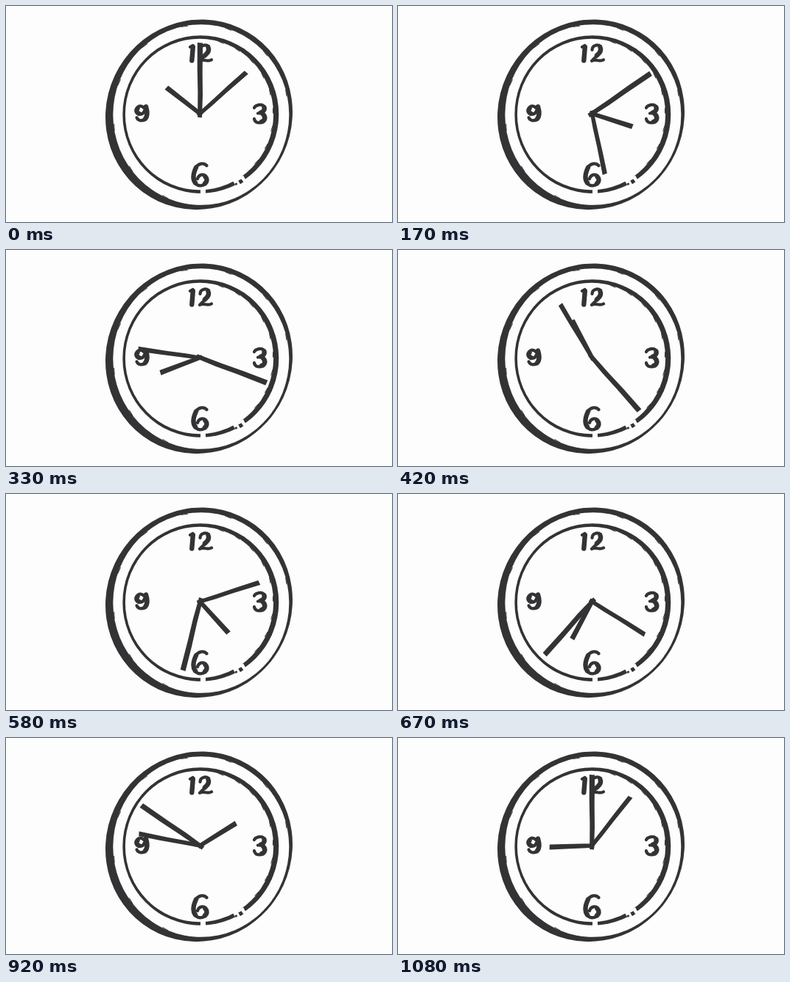
Animation, 524 px wide and 295 px high, one loop 1160 ms. Source, as an HTML page:

```html
<!DOCTYPE html>
<html lang="en">
<head>
<meta charset="utf-8">
<title>Clock</title>
<style>
  html, body { margin: 0; width: 100%; height: 100%; overflow: hidden; background: #fdfdfd; }
  svg { display: block; width: 100vw; height: 100vh; }
  .ink { fill: #333335; }
  .paper { fill: #fdfdfd; }
  .line { fill: none; stroke: #333335; stroke-linecap: round; stroke-linejoin: round; }
  .thin { stroke-width: 4.2; }
  .bold { stroke-width: 6.4; }
  .gap { fill: none; stroke: #fdfdfd; }
</style>
</head>
<body>
<svg viewBox="0 0 524 295">
  <!-- rims: offset and tilted ellipses give the brush its varying weight -->
  <ellipse class="ink" cx="262" cy="148.3" rx="126.2" ry="130.6" transform="rotate(25 262 148.3)"/>
  <ellipse class="paper" cx="264.8" cy="148.5" rx="119.5" ry="123.3"/>
  <ellipse class="ink" cx="264.3" cy="148" rx="106" ry="107.8"/>
  <ellipse class="paper" cx="262.5" cy="148" rx="100.6" ry="103.2"/>
  <g id="bristles" class="line" stroke-width="1"></g>
  <g class="gap">
    <path d="M267.5 247V261" stroke-width="7"/>
    <path d="M315 235L322 248" stroke-width="16"/>
  </g>
  <g class="ink">
    <path d="M310.5 242.5l2.6-1.2l1.2 2.4l-2.6 1.2z"/>
    <path d="M315.3 238.6l4.2-2.4l2.8 4.4l-4.4 2.6z"/>
  </g>
  <g class="line thin">
    <path d="M250 56L253.5 54"/>
    <path d="M263.5 60C263.5 53.5 271 52 275 55M270 68L263 75C268 71.5 273 77 279 73.5"/>
    <path d="M337 139C339 134.5 347 134 350 136.5M342 146.5L348 146M347 159C341 160.5 337.5 158 337 154"/>
    <path d="M187 139C184 135.5 180 136 178.5 139M181 148C185 148 187 146 188 143M189 155C184 157.5 179 156.5 177.5 152.5"/>
    <path d="M272.5 218C269 214 262 214.5 258 220M257 242C260 246.5 267 246 270 243M270.5 232C268 229 261.5 230 260 236"/>
  </g>
  <g class="line bold">
    <path d="M253.8 56L252.3 74.5"/>
    <path d="M274.5 56.5C276.5 61 273 65 270 67.5"/>
    <path d="M350.5 138.5C351.5 142 349 144.5 346 145.5M349.5 148.5C353 152 351 157 347 158"/>
    <path d="M178.5 140C176 143 178 146 180.5 147M190 137.5C192 144 192 151 189 154"/>
    <path d="M258 220.5C254 229 253.5 237 257 241.5M270.5 233C273.5 236 273 240 270 242.5"/>
  </g>
  <g class="ink">
    <path id="long" d="M-3.2 5L-3-30L-3.7-62L-3.5-97L3.7-96.5L3.3-55L3.6-25L2.6 5.5z"/>
    <path id="middle" d="M-2.7 4L-2.8-28L-3.2-55L-3.1-84L3.4-85L2.8-45L3-20L2.4 4z"/>
    <path id="short" d="M-2.8 3L-3.1-25L-3.5-58L3.5-57.5L3.2-30L2.8 3z"/>
  </g>
</svg>
<script>
const byId = id => document.getElementById(id);
const LOOP = 1160, FPS = 12;

// [step, degrees clockwise from twelve]
const hands = {
  long: [[0, 0], [13, 360]],
  middle: [[0, 48], [2, 168], [4, 278], [7, 432], [8, 482], [11, 641], [13, 758]],
  short: [[0, 308], [2, 468], [4, 609], [7, 858], [8, 928], [11, 1138], [13, 1348]]
};

function angleAt(keys, step) {
  const i = Math.max(1, keys.findIndex(([s]) => s >= step));
  const [s0, a0] = keys[i - 1], [s1, a1] = keys[i];
  return a0 + (a1 - a0) * (step - s0) / (s1 - s0);
}

// Faint strokes that leave the inside of a rim at a slight slant, like dry brush hair.
function bristle(cx, cy, rx, ry, degrees) {
  const point = (deg, inset) => {
    const a = deg * Math.PI / 180;
    return `${cx + (rx - inset) * Math.cos(a)} ${cy + (ry - inset) * Math.sin(a)}`;
  };
  return `<path d="M${point(degrees, 0)}L${point(degrees + 4, 0.7)}"/>`;
}

let strokes = "";
for (let i = 0; i < 9; i++) {
  strokes += bristle(264.8, 148.5, 119.5, 123.3, 112 + i * 29);
  strokes += bristle(262.5, 148, 100.6, 103.2, -75 + i * 14);
}
byId("bristles").innerHTML = strokes;

function draw(now) {
  // steps fall on multiples of 10 ms, hence the small lead
  const step = Math.floor((now % LOOP + 4) * FPS / 1000);
  for (const name in hands)
    byId(name).setAttribute("transform", `translate(263.4 147) rotate(${angleAt(hands[name], step)})`);
}

const start = performance.now();
function tick() {
  draw(performance.now() - start);
  requestAnimationFrame(tick);
}
tick();
</script>
</body>
</html>
```
